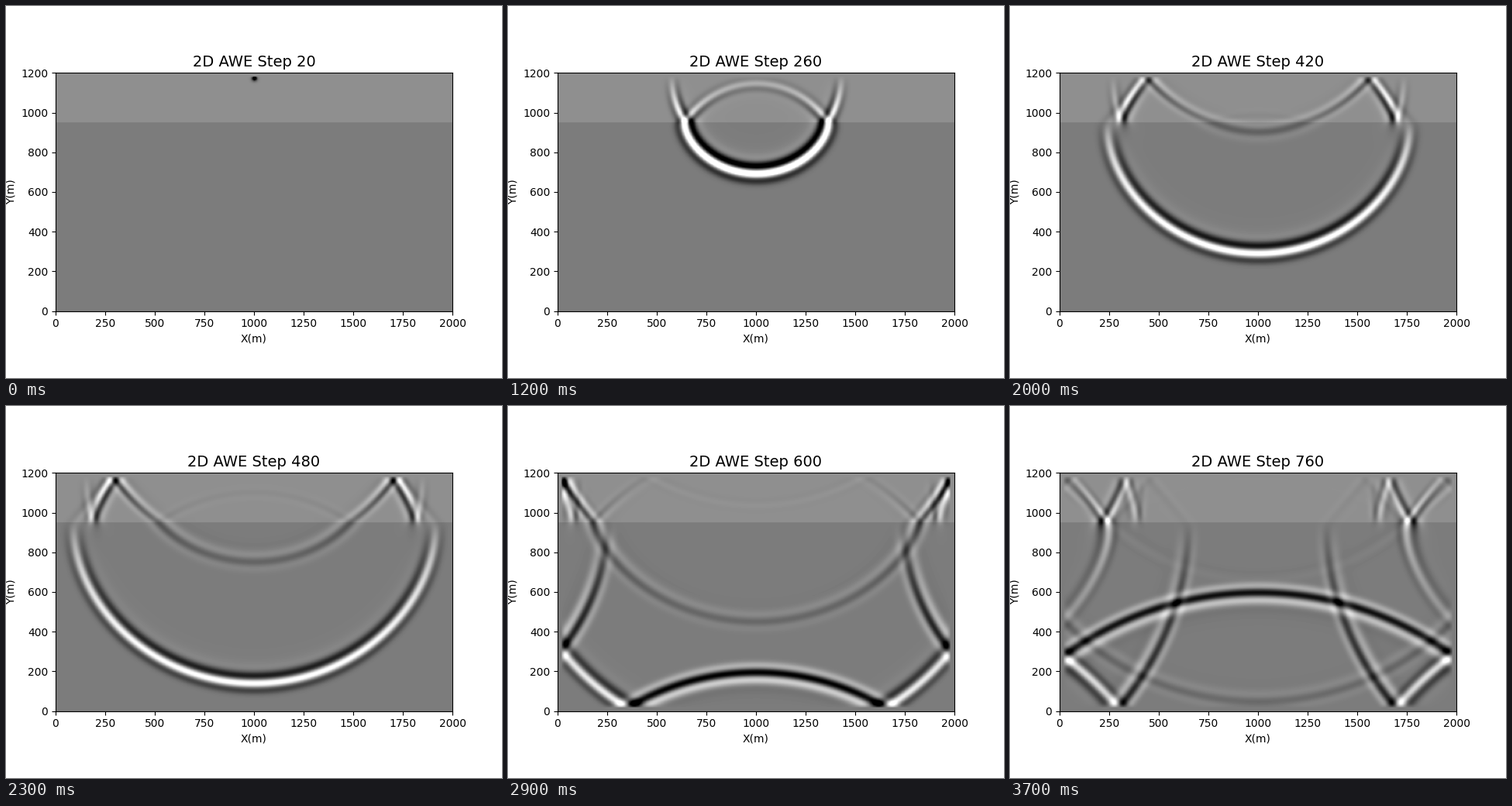
These frames come from a looping animation (640x480 px, 3.8 s). A matplotlib script:

```python
import numpy as np
import matplotlib.pyplot as plt
from matplotlib.animation import FuncAnimation

plt.rcParams["font.family"] = "DejaVu Sans"

# Grid and medium (metres, seconds)
NX, NZ, H, DT = 400, 240, 5.0, 0.001
STRIDE, FRAMES = 20, 38
INTERFACE, PAD = 50, 4
SOURCE = (5, 200)
FREQ = 25.0
STENCIL = (-205 / 72, 8 / 5, -1 / 5, 8 / 315, -1 / 560)

# Grey levels
TOP_GREY, BOTTOM_GREY = 143, 124
LATE_CREST = 112


def ricker(t):
    a = (np.pi * FREQ * (t - 1 / FREQ)) ** 2
    return (1 - 2 * a) * np.exp(-a)


def laplacian(p):
    """Eighth-order Laplacian of the cells inside the rigid rim."""
    out = 2 * STENCIL[0] * p[PAD:-PAD, PAD:-PAD]
    for k, c in enumerate(STENCIL[1:], 1):
        for s in (-k, k):
            out += c * p[PAD + s:NZ - PAD + s, PAD:-PAD]
            out += c * p[PAD:-PAD, PAD + s:NX - PAD + s]
    return out


def simulate():
    speed = np.full((NZ, NX), 2500.0)
    speed[:INTERFACE] = 1900.0
    courant2 = ((speed * DT / H) ** 2)[PAD:-PAD, PAD:-PAD]
    previous, current = np.zeros((NZ, NX)), np.zeros((NZ, NX))
    snapshots = []
    for step in range(STRIDE * FRAMES + 1):
        following = np.zeros((NZ, NX))
        inner = (slice(PAD, -PAD), slice(PAD, -PAD))
        following[inner] = 2 * current[inner] - previous[inner] + courant2 * laplacian(current)
        following[SOURCE] += ricker(step * DT)
        previous, current = current, following
        if step and step % STRIDE == 0:
            snapshots.append(current.copy())
    return snapshots


waves = simulate()
background = np.full((NZ, NX), float(BOTTOM_GREY))
background[:INTERFACE] = TOP_GREY
# Exposure is set by the crest that has bounced off the floor
gain = LATE_CREST / abs(waves[-1][100:150, SOURCE[1]].min())

fig = plt.figure(figsize=(6.4, 4.8), dpi=100)
ax = fig.add_axes([0.1, 0.1, 0.8, 0.8])
image = ax.imshow(background, cmap="gray", vmin=0, vmax=255,
                  extent=[0, NX * H, 0, NZ * H])
ax.set_xlabel("X(m)")
ax.set_ylabel("Y(m)")
title = ax.set_title("", fontsize=14)


def update(i):
    image.set_data(np.clip(background + gain * waves[i], 0, 255))
    title.set_text(f"2D AWE Step {(i + 1) * STRIDE}")
    return image, title


anim = FuncAnimation(fig, update, frames=FRAMES, interval=100, repeat=True, repeat_delay=0)
plt.show()
```
